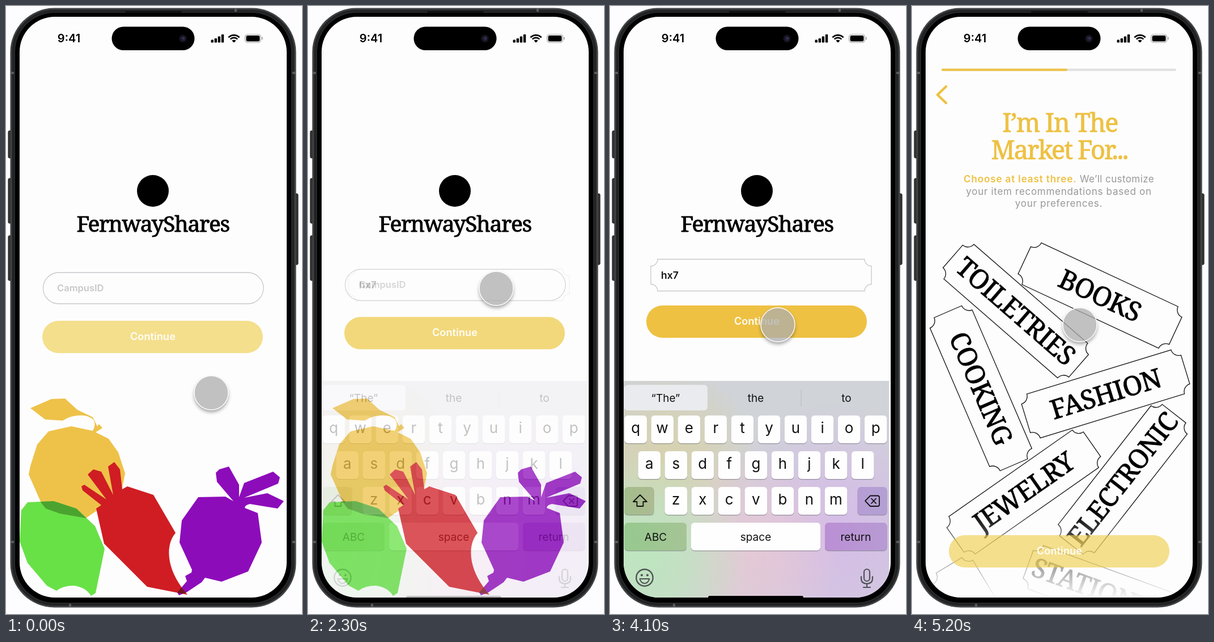
Write an HTML page with a canvas that moves like this. It is 522 px wide and 1072 px high and loops after 5.3 s.

```html
<!DOCTYPE html>
<html lang="en">
<head>
<meta charset="utf-8">
<title>Sign-in flow</title>
<style>
html, body { margin: 0; width: 100%; height: 100%; overflow: hidden; background: #fdfcfe; }
canvas { display: block; }
</style>
</head>
<body>
<canvas id="stage" width="522" height="1072"></canvas>
<script>
const W = 522, H = 1072, LOOP = 5300;
const GOLD = '#edc143', PAPER = '#fefdfe';
const SANS = 'Inter, Roboto, sans-serif', SERIF = '"Noto Serif", "DejaVu Serif", serif';
const main = document.getElementById('stage').getContext('2d');

function layer(draw) {
  const canvas = document.createElement('canvas');
  canvas.width = W;
  canvas.height = H;
  draw(canvas.getContext('2d'));
  return canvas;
}

function box(c, x, y, w, h, r, fill, stroke, width = 1) {
  c.beginPath();
  c.roundRect(x, y, w, h, r);
  if (fill) { c.fillStyle = fill; c.fill(); }
  if (stroke) { c.strokeStyle = stroke; c.lineWidth = width; c.stroke(); }
}

function disc(c, x, y, r, fill) {
  c.beginPath();
  c.arc(x, y, r, 0, Math.PI * 2);
  c.fillStyle = fill;
  c.fill();
}

function line(c, d, color, width) {
  c.strokeStyle = color;
  c.lineWidth = width;
  c.lineCap = c.lineJoin = 'round';
  c.stroke(new Path2D(d));
}

function text(c, str, x, y, font, color, align = 'center', spacing = 0) {
  c.font = font;
  c.textAlign = align;
  c.letterSpacing = spacing + 'px';
  c.fillStyle = color;
  c.fillText(str, x, y);
}

// Serif lettering, slightly thickened
function slab(c, str, x, y, size, color, spacing) {
  text(c, str, x, y, `${size}px ${SERIF}`, color, 'center', spacing);
  c.strokeStyle = color;
  c.lineWidth = .9;
  c.lineJoin = 'round';
  c.strokeText(str, x, y);
}

// Rectangle with concave corners, centred on the current origin
function ticket(c, w, h, r, color, width) {
  const x = w / 2, y = h / 2, q = Math.PI / 2;
  c.beginPath();
  c.arc(-x, -y, r, q, 0, true);
  c.arc(x, -y, r, 2 * q, q, true);
  c.arc(x, y, r, 3 * q, 2 * q, true);
  c.arc(-x, y, r, 0, 3 * q, true);
  c.closePath();
  c.strokeStyle = color;
  c.lineWidth = width;
  c.stroke();
}

const phone = layer(c => {
  for (const [y, h] of [[220, 48], [304, 79], [405, 79]]) box(c, 4, y, 7, h, 2, '#353535', '#1c1c1c');
  box(c, 508, 331, 7, 125, 2, '#353535', '#1c1c1c');
  box(c, 7.5, 3.5, 504, 1057, 78, '#2b2c2d');
  box(c, 9, 5, 501, 1054, 76, null, '#454647', 2);
  box(c, 13, 9, 493, 1046, 72, null, '#202122', 3);
  box(c, 16, 12, 487, 1040, 69, '#000');
  c.fillStyle = '#5a5b5c';
  for (const y of [116, 943]) {
    c.fillRect(8, y, 6, 4);
    c.fillRect(505, y, 6, 4);
  }
  c.fillRect(403, 4, 4, 6);
  c.fillRect(111, 1054, 4, 6);
  box(c, 210, 9, 100, 2.5, 1, '#0c0c0c');
  box(c, 24, 19, 471, 1024, 62, PAPER);
});

const status = layer(c => {
  text(c, '9:41', 111, 64, `600 20px ${SANS}`, '#000');
  box(c, 186.5, 36.5, 146, 41.5, 20.7, '#000');
  disc(c, 312, 57.5, 7, '#111018');
  disc(c, 312, 57.5, 4.5, '#211d33');
  disc(c, 313, 57, 1.8, '#41395f');
  [5, 7.5, 11, 14.5].forEach((h, i) => box(c, 361.5 + i * 6.1, 64.5 - h, 4.4, h, 1.3, '#000'));
  c.save();
  c.beginPath();
  c.moveTo(402, 64.5);
  c.arc(402, 64.5, 16, -Math.PI * .76, -Math.PI * .24);
  c.clip();
  c.strokeStyle = '#000';
  for (const [r, w] of [[13.2, 2.8], [8.6, 2.6], [2.4, 4.8]]) {
    c.beginPath();
    c.arc(402, 64.5, r, 0, Math.PI * 2);
    c.lineWidth = w;
    c.stroke();
  }
  c.restore();
  box(c, 421.5, 50, 28, 14.5, 5, null, '#a9a9a9', 1.2);
  box(c, 423.5, 52, 24, 10.5, 3, '#000');
  box(c, 451, 54.5, 1.8, 5, 1, '#a9a9a9');
});

const fruit = layer(c => {
  const leaf = new Path2D('M43 709L80 693L104 692L126 712L153 725L161 741L164 737L170 744L154 754L152 750Q160 739 154 729Q143 720 127 722Q112 723 100 731L69 729Z');
  const orange = new Path2D('M75 750L115 741L153 749L181 763L198 787L210 824L203 860L141 903L95 895L70 886L62 876L40 826L43 811L55 773Z');
  const pear = new Path2D('M27 889L38 875L84 873L124 886L157 917L174 957L158 1035L150 1040Q141 1025 120 1022Q100 1022 89 1031L72 1022L38 982L24 944Z');
  const beet = new Path2D('M339 866L387 865L401 873L372 839L370 823L376 817L393 812L411 844L411 866L420 841L471 821L483 831L480 842L420 867L461 859L490 873L479 886L430 878Q421 880 421 885L444 894L451 946L427 997L380 1015L351 1008L345 1016L318 1034L305 1039L302 1034L319 1014L316 1005L327 999L328 994L306 946L310 907Z');
  const carrot = new Path2D('M159 886L168 880L135 854L133 847L138 844L177 870L144 826L154 817L168 821L189 862L180 812L191 804L201 817L205 852L214 847L260 862L299 929Q283 948 289 980Q295 1009 320 1038L249 1024L173 948Z');
  const fill = (shape, color) => { c.fillStyle = color; c.fill(shape); };
  const overlap = (a, b, color) => {
    c.save();
    c.clip(a);
    fill(b, color);
    c.restore();
  };
  fill(leaf, '#eec249');
  fill(orange, '#eec249');
  fill(pear, '#68e147');
  overlap(pear, orange, '#4ba32f');
  fill(beet, '#8d0cba');
  fill(carrot, '#cf1d23');
  overlap(carrot, beet, '#71151f');
});

const logo = layer(c => {
  disc(c, 259, 326, 28, '#000');
  slab(c, 'FernwayShares', 259, 398, 39, '#000', -1.4);
});

const keyboard = layer(c => {
  const X = 24, Y = 661, KW = 468, KH = 383, INK = '#111', ICON = '#505356';
  c.fillStyle = '#d0d3d8';
  c.fillRect(X, Y, KW, KH);
  c.save();
  c.beginPath();
  c.rect(X, Y, KW, KH);
  c.clip();
  const blob = (x, y, r, rgb, a) => {
    const g = c.createRadialGradient(x, y, 0, x, y, r);
    g.addColorStop(0, `rgba(${rgb},${a})`);
    g.addColorStop(.45, `rgba(${rgb},${a * .7})`);
    g.addColorStop(1, `rgba(${rgb},0)`);
    c.fillStyle = g;
    c.fillRect(X, Y, KW, KH);
  };
  blob(100, 800, 165, '216,209,166', .85);
  blob(400, 930, 230, '213,187,232', .95);
  blob(240, 960, 170, '232,200,212', .85);
  blob(60, 970, 185, '190,229,190', 1);
  c.restore();

  box(c, 25, 668, 147, 45, 6, '#e9ebee');
  c.fillStyle = '#b9bbc1';
  c.fillRect(336.5, 676, 1, 30);
  const label = (s, x, y) => text(c, s, x, y, `400 19px ${SANS}`, INK);
  label('“The”', 98, 698);
  label('the', 257, 698);
  label('to', 417, 698);

  const key = (x, y, w, fill) => {
    box(c, x, y + 1.2, w, 49, 6, 'rgba(90,90,100,.5)');
    box(c, x, y, w, 49, 6, fill);
  };
  [['qwertyuiop', 25.5, 722], ['asdfghjkl', 49.5, 785], ['zxcvbnm', 96.5, 848]].forEach(([chars, x, y]) => {
    [...chars].forEach((ch, i) => {
      const left = x + i * 47.05;
      key(left, y, 39.5, '#fefefe');
      text(c, ch, left + 19.7, y + 31, `400 26px ${SANS}`, INK);
    });
  });
  const tint = (x, w, a, b) => {
    const g = c.createLinearGradient(x, 0, x + w, 0);
    g.addColorStop(0, a);
    g.addColorStop(1, b);
    return g;
  };
  key(25.5, 848, 52, tint(25, 52, '#a3bd8c', '#adbb92'));
  key(436.5, 848, 52, tint(436, 52, '#b69dd4', '#b2a0d3'));
  key(25.5, 911, 109.5, tint(25, 110, '#96c98e', '#a6c496'));
  key(143, 911, 228, '#fefefe');
  key(379, 911, 109.5, tint(379, 110, '#bb8fd5', '#b79bd3'));
  label('ABC', 80.5, 943);
  label('space', 257, 943);
  label('return', 433.5, 943);

  line(c, 'M53 862L65 874H58.5V882H47.5V874H41Z', INK, 1.8);
  line(c, 'M459 863.5H472Q475 863.5 475 866.5V879Q475 882 472 882H459L450 872.7Z', INK, 1.8);
  line(c, 'M461 868.5L469 877M469 868.5L461 877', INK, 1.8);

  c.beginPath();
  c.arc(61, 1008, 14.7, 0, Math.PI * 2);
  c.strokeStyle = ICON;
  c.lineWidth = 2.4;
  c.stroke();
  disc(c, 56, 1003.5, 2.1, ICON);
  disc(c, 66, 1003.5, 2.1, ICON);
  line(c, 'M52.5 1010H69.5Q67 1018 61 1018Q55 1018 52.5 1010Z', ICON, 2);
  box(c, 448, 993, 10, 21, 5, null, ICON, 2.2);
  line(c, 'M443 1006V1009Q443 1018.5 453 1018.5Q463 1018.5 463 1009V1006M453 1019V1025M447 1025H459', ICON, 2.2);
  box(c, 173, 1040, 168, 8, 3, '#000');
});

const market = layer(c => {
  const TICKETS = [
    ['TOILETRIES', 183, 538, 41], ['BOOKS', 331.5, 510.5, 25], ['COOKING', 121.5, 674, 66.7],
    ['FASHION', 341.5, 684, -17], ['JEWELRY', 197, 857, -35], ['ELECTRONIC', 371.5, 834.5, -52],
    ['STATIONERY', 343, 1035, 20], ['', 141, 1112, 59]
  ];
  for (const [name, x, y, deg] of TICKETS) {
    c.save();
    c.translate(x, y);
    c.rotate(deg * Math.PI / 180);
    ticket(c, 294, 81, 14, '#111', 1.3);
    slab(c, name, 0, 16.5, 47, '#000', -1);
    c.restore();
  }
  // Fade towards the bottom edge
  const g = c.createLinearGradient(0, 890, 0, 1045);
  g.addColorStop(0, 'rgba(0,0,0,0)');
  g.addColorStop(1, 'rgba(0,0,0,1)');
  c.globalCompositeOperation = 'destination-out';
  c.fillStyle = g;
  c.fillRect(0, 890, W, H - 890);
  c.globalCompositeOperation = 'source-over';

  box(c, 52, 110.5, 414, 4, 2, '#e0dfe2');
  box(c, 52, 110.5, 222, 4, 2, GOLD);
  line(c, 'M60 142L45 156.5L60 171', GOLD, 4.5);
  slab(c, 'I’m In The', 261, 222, 45, GOLD, -1.6);
  slab(c, 'Market For...', 260, 270, 45, GOLD, -1.9);
  const body = `400 17px ${SANS}`, grey = '#999';
  text(c, 'Choose at least three.', 91, 311, `600 17px ${SANS}`, GOLD, 'left', .9);
  text(c, 'We’ll customize', 427, 311, body, grey, 'right', .4);
  text(c, 'your item recommendations based on', 259, 333, body, grey, 'center', .7);
  text(c, 'your preferences.', 259, 354, body, grey, 'center', .7);
});

const mix = (a, b, p) => a + (b - a) * p;
const span = (t, start, length) => Math.min(1, Math.max(0, (t - start) / length));
const easeOut = p => 1 - (1 - p) ** 1.7;
const easeInOut = p => p * p * (3 - 2 * p);

function fade(alpha, draw) {
  if (alpha <= 0) return;
  main.save();
  main.globalAlpha = alpha;
  draw(main);
  main.restore();
}

const show = (image, alpha) => fade(alpha, c => c.drawImage(image, 0, 0));

function drawField(focus, leave) {
  const cy = mix(497.5, 474.5, focus), base = cy + 5.5;
  fade(1 - focus, c => {
    box(c, 65.5, cy - 27.5, 388.5, 55, 27.5, null, '#c8c8ca', 1.3);
    text(c, 'CampusID', 90, base, `600 16.5px ${SANS}`, '#c8c8ca', 'left');
  });
  fade(focus * (1 - leave), c => {
    c.save();
    c.translate(266.5, cy);
    ticket(c, 389, 56, 12, '#c8c8cc', 1.3);
    c.restore();
    text(c, 'hx7', 90, base + 1, `600 17.5px ${SANS}`, '#111', 'left');
  });
}

function drawButton(focus, leave) {
  const x = 64 + leave, y = mix(mix(555, 528, focus), 933, leave);
  const active = focus - leave;
  const color = `rgb(238,${mix(203, 193, active)},67)`;
  fade(mix(.6, 1, active), c => box(c, x, y, 389, 57, 28.5, color));
  text(main, 'Continue', x + 195, y + 34, `600 18px ${SANS}`, '#fffdf8', 'center', .15);
}

function drawCursor(t) {
  const a = easeInOut(span(t, 850, 700)), b = easeInOut(span(t, 2650, 600));
  const x = mix(mix(362, 332, a), 296, b), y = mix(mix(682, 498, a), 562, b);
  const c = main;
  c.save();
  c.beginPath();
  c.rect(0, 0, W, H);
  c.arc(x, y, 30.5, 0, Math.PI * 2);
  c.clip('evenodd');
  c.shadowColor = 'rgba(0,0,0,.38)';
  c.shadowBlur = 6;
  c.shadowOffsetY = 4;
  disc(c, x, y, 30, '#aaa');
  c.restore();
  disc(c, x, y, 30, 'rgba(174,174,174,.745)');
  c.beginPath();
  c.arc(x, y, 30, 0, Math.PI * 2);
  c.strokeStyle = '#fafafa';
  c.lineWidth = 1.5;
  c.stroke();
}

function render(t) {
  const focus = easeOut(span(t, 2255, 300));
  const leave = easeOut(span(t, 4118, 300));
  main.fillStyle = '#fdfcfe';
  main.fillRect(0, 0, W, H);
  main.drawImage(phone, 0, 0);

  main.save();
  main.beginPath();
  main.roundRect(24, 19, 471, 1024, 62);
  main.clip();
  show(fruit, 1 - leave);
  show(logo, 1 - leave);
  drawField(focus, leave);
  show(market, leave);
  drawButton(focus, leave);
  show(keyboard, focus * (1 - leave));
  main.restore();

  main.drawImage(status, 0, 0);
  drawCursor(t);
}

const start = performance.now();
function tick() {
  render((performance.now() - start) % LOOP);
  requestAnimationFrame(tick);
}
tick();
</script>
</body>
</html>
```
